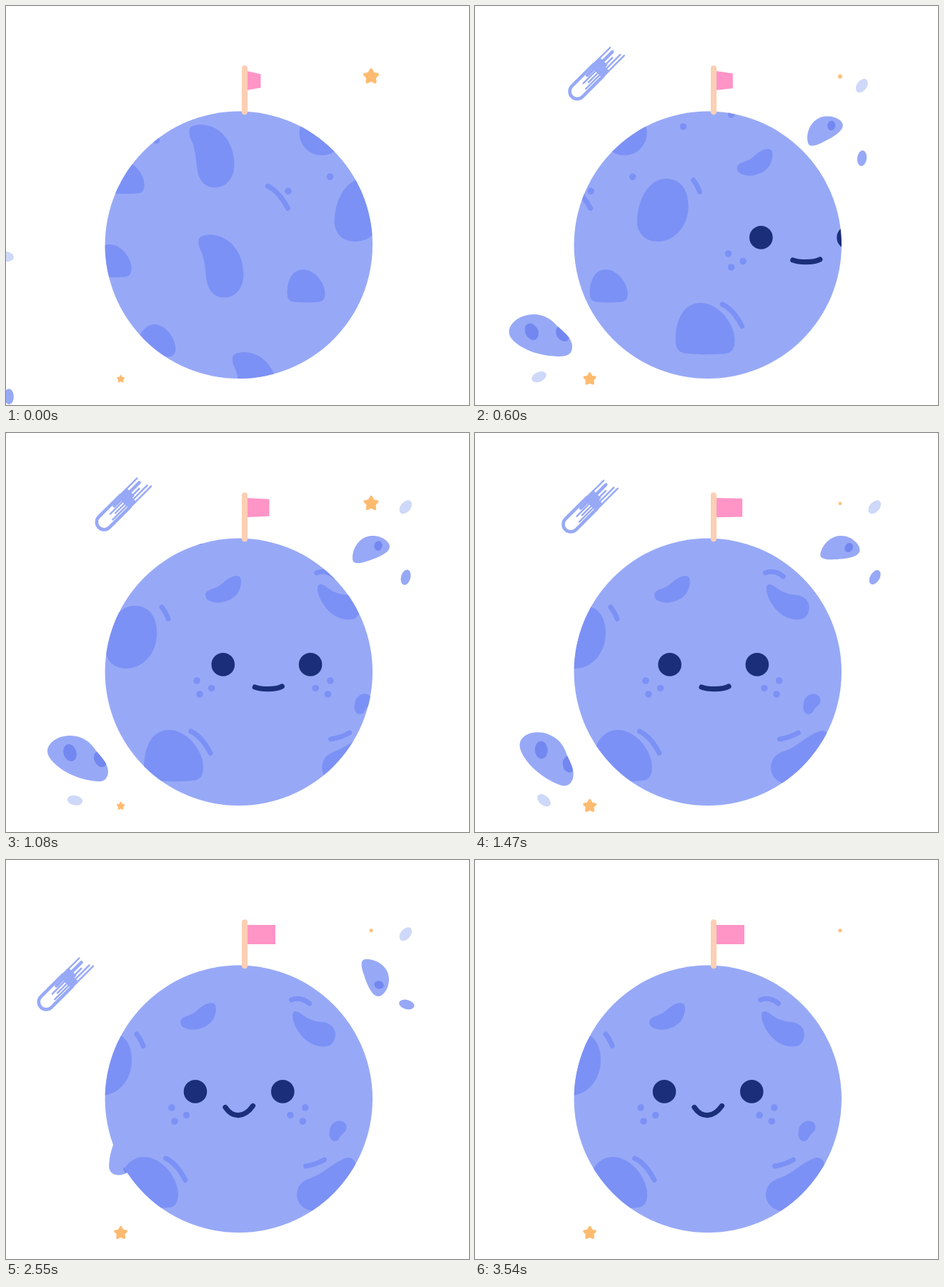
These frames come from a looping animation (648x559 px, 3570 ms). An HTML page:

```html
<!DOCTYPE html>
<html lang="en">
<head>
<meta charset="utf-8">
<title>Little planet</title>
<style>
  html, body { margin: 0; width: 100%; height: 100%; overflow: hidden; background: #fff; }
  svg { display: block; width: 648px; height: 559px; }

  .turn, .fly, .spin, .comet, .star, .flag, .mouth {
    animation: 3570ms linear infinite;
  }
  /* cubic ease-out, unless a keyframe says otherwise */
  .turn, .fly, .comet { animation-timing-function: cubic-bezier(.3333, 1, .6667, 1); }
  .star, .flag { animation-timing-function: cubic-bezier(.37, 0, .63, 1); }
  .mouth { animation-timing-function: ease-in-out; }

  /* planet surface and face slide at different speeds */
  .turn { animation-name: turn; }
  @keyframes turn {
    from { translate: var(--x) 0; }
    56.3%, to { translate: 0 0; }
  }

  /* debris: swoop in, hover, swoop out with a cubic ease-in */
  .fly { animation-name: var(--name); }
  @keyframes rock {
    from { translate: var(--start); }
    24.65%, 70.73% { translate: 0 0; }
    70.73% { animation-timing-function: cubic-bezier(.3333, 0, .6667, 0); }
    to { translate: var(--end); }
  }
  @keyframes chip {
    from { translate: var(--start); }
    24.65%, 60.92% { translate: 0 0; }
    60.92% { animation-timing-function: cubic-bezier(.3333, 0, .6667, 0); }
    to { translate: var(--end); }
  }
  @keyframes pebble {
    from { translate: var(--start); }
    24.65%, 76.25% { translate: 0 0; }
    76.25% { animation-timing-function: cubic-bezier(.3333, 0, .6667, 0); }
    to { translate: var(--end); }
  }
  @keyframes crumb {
    from { translate: var(--start); }
    24.65%, 77.6% { translate: 0 0; }
    77.6% { animation-timing-function: cubic-bezier(.3333, 0, .6667, 0); }
    to { translate: var(--end); }
  }

  .spin { animation-name: var(--how, spin); transform-origin: var(--at); }
  @keyframes spin {
    from { rotate: -16deg; }
    16.81% { rotate: -8deg; }
    30.25% { rotate: 0deg; animation-timing-function: cubic-bezier(.333, .1, .667, .58); }
    53.78% { rotate: 46deg; }
    71.43% { rotate: 90deg; }
    to { rotate: 162deg; }
  }
  @keyframes tumble {
    from { rotate: -77deg; }
    16.81% { rotate: -25deg; }
    53.78% { rotate: 75deg; }
    84.03% { rotate: 182deg; }
    to { rotate: 238deg; }
  }
  @keyframes settle {
    from { rotate: -120deg; animation-timing-function: cubic-bezier(.3333, 1, .6667, 1); }
    24.65%, to { rotate: 0deg; }
  }

  .comet { animation-name: comet; }
  @keyframes comet {
    from { translate: 168.5px -153px; }
    24.65% { translate: -6.5px 6px; animation-timing-function: cubic-bezier(.3333, 0, .6667, 0); }
    53.78% { translate: -25.5px 23.5px; animation-timing-function: cubic-bezier(.333, .19, .667, .35); }
    71.43% { translate: -87.5px 80px; animation-timing-function: cubic-bezier(.333, .21, .667, .61); }
    84.03%, to { translate: -242px 220px; }
  }

  .star { animation-name: pulse; }
  @keyframes pulse {
    from, 28.01%, 56.02%, 84.03% { scale: var(--a); }
    14.01%, 42.02%, 70.03%, 98.04% { scale: var(--b); }
    to { scale: var(--c); }
  }

  .flag { animation-name: flag; }
  @keyframes flag {
    from { d: path("M337 91L356.5 95.5L356.5 114.5L337 118Z"); }
    54.6%, to { d: path("M337 91L377 91L377 118L337 118Z"); }
  }

  .mouth { animation-name: smile; }
  @keyframes smile {
    from, 55.5% { d: path("M309.5 356C318 359.5 338 360 347.5 355"); }
    66%, to { d: path("M307 346.5C317 361.5 333 362 345.5 344.5"); }
  }

  .body { fill: #97a9f6; }
  .pale { fill: #ced8f8; }
  .pit { fill: #7287f0; }
  .mark { fill: #7c91f5; }
  .line { fill: none; stroke: #7c91f5; stroke-width: 7; stroke-linecap: round; }
  .gold { fill: #fdbb70; stroke: #fdbb70; stroke-width: 4; stroke-linejoin: round; }
</style>
</head>
<body>
<svg viewBox="0 0 648 559">
  <defs>
    <clipPath id="disc"><circle cx="325.8" cy="334.8" r="187.2"/></clipPath>
    <path id="rockShape" d="M58 444C60 432 75 423 92 424C108 425 118 433 126 445C134 455 143 463 143 475C142 484 138 489 127 488C110 487 88 479 75 469C65 461 57 453 58 444Z"/>
    <clipPath id="rockClip"><use href="#rockShape"/></clipPath>
    <path id="dome" d="M0 52C0 24 11 0 35 0C61 0 83 30 83 52C83 64 79 70 69 71C49 73 27 72 16 71C4 70 0 63 0 52Z"/>
    <path id="boot" d="M0 10C-1 2 7 0 18 0C43 1 63 24 63 56C63 76 51 88 36 88C21 88 13 77 11 62C9 44 8 34 4 24C1 18 0 15 0 10Z"/>
    <path id="starShape" class="gold" d="M0-9.5L2.94-4.05L9.03-2.94L4.76 1.55L5.58 7.69L0 5L-5.58 7.69L-4.76 1.55L-9.03-2.94L-2.94-4.05Z"/>
    <circle id="dot" r="4.8"/>
  </defs>

  <g class="comet">
    <g transform="translate(144 118.7) rotate(-45)" fill="none" stroke="#97a9f6">
      <path stroke-width="4.6" d="M44-10.5H0A10.5 10.5 0 0 0 0 10.5H42"/>
      <path stroke="none" fill="#97a9f6" d="M38-12H56V4H52V12H38Z"/>
      <g stroke-linecap="round">
        <path stroke-width="2.4" d="M40-10.8H76M50 1.5H68M48 6.2H79M40 11H82M14-2H40M20 2.2H40M11 6H40"/>
        <path stroke-width="4.6" d="M50-4.4H74M26-6H40"/>
      </g>
    </g>
  </g>

  <g class="fly" style="--name:crumb;--start:-557px 346px;--end:410px -203px">
    <g class="spin" style="--at:560px 203px">
      <ellipse class="body" cx="559.5" cy="202.2" rx="11" ry="6.6" transform="rotate(-75 559.5 202.2)"/>
    </g>
  </g>
  <g class="fly" style="--name:crumb;--start:-561px 248px;--end:448px -150px">
    <g class="spin" style="--how:settle;--at:559.3px 103.7px">
      <ellipse class="pale" cx="559.3" cy="103.7" rx="10.8" ry="7" transform="rotate(-50 559.3 103.7)"/>
    </g>
  </g>
  <g class="fly" style="--name:pebble;--start:-656px 330px;--end:509px -265px">
    <g class="spin" style="--at:513px 167px">
      <path class="body" d="M485 175C485 160 496 144 513 144C526 144 537 152 537 159C537 168 520 175 507 179C499 182 493 183 489 182C486 181 485 179 485 175Z"/>
      <ellipse class="pit" cx="521" cy="158" rx="5.6" ry="6.8" transform="rotate(15 521 158)"/>
    </g>
  </g>
  <g class="fly" style="--name:chip;--start:-219px 156px;--end:2265px -1608px">
    <g class="spin" style="--how:tumble;--at:96.5px 514.7px">
      <ellipse class="pale" cx="96.5" cy="514.7" rx="10.8" ry="6.8"/>
    </g>
  </g>
  <g class="fly" style="--name:rock;--start:-281px 187px;--end:952px -743px">
    <g class="spin" style="--at:105.3px 457.8px">
      <use class="body" href="#rockShape"/>
      <g class="pit" clip-path="url(#rockClip)">
        <ellipse cx="89.5" cy="448" rx="9" ry="12.3" transform="rotate(-18 89.5 448)"/>
        <ellipse cx="132" cy="457" rx="8.5" ry="11.5" transform="rotate(-25 132 457)"/>
      </g>
    </g>
  </g>

  <circle class="body" cx="325.8" cy="334.8" r="187.2"/>
  <g clip-path="url(#disc)">
    <g class="turn" style="--x:356px">
      <g class="mark">
        <path d="M244 226C246 218 258 219 266 212C274 204 284 198 291 201C297 205 293 220 288 226C278 237 262 240 252 236C246 234 244 231 244 226Z"/>
        <path d="M401 216C402 211 406 211 411 214C420 221 428 226 443 227C453 228 460 234 461 243C461 252 457 260 449 261C438 263 425 258 416 249C407 239 400 226 401 216Z"/>
        <path d="M176 281C176 308 157 330 133 330C115 330 104 318 104 301C105 270 121 242 145 242C165 242 176 257 176 281Z"/>
        <path d="M453 380C453 370 462 364 470 366C478 368 478 377 474 381C469 385 468 387 466 391C463 395 456 395 454 390C452 386 452 384 453 380Z"/>
        <path d="M407 468C408 456 414 450 425 446C445 440 460 421 478 417C492 416 495 440 490 460L470 500L430 492C415 490 407 480 407 468Z"/>
        <path d="M-171 470C-166 452-156 446-148 446C-132 446-118 466-118 480C-118 490-126 493-132 491C-146 488-161 480-171 470Z"/>
        <ellipse cx="86.5" cy="178" rx="31.5" ry="31.3"/>
        <use href="#dome" x="158" y="416"/>
        <use href="#dome" transform="translate(38 369.3) scale(.64)"/>
        <use href="#dome" transform="translate(-233 334) scale(.64)"/>
        <use href="#dome" transform="translate(-215 217) scale(.64)"/>
        <use href="#boot" x="-99" y="166.3"/>
        <use href="#boot" x="-86" y="320.5"/>
        <use href="#boot" x="-38.5" y="485"/>
        <use href="#dot" x="232" y="347"/>
        <use href="#dot" x="252.5" y="357.5"/>
        <use href="#dot" x="236" y="366"/>
        <use href="#dot" x="418.8" y="347"/>
        <use href="#dot" x="398" y="357.5"/>
        <use href="#dot" x="415.3" y="366"/>
        <use href="#dot" x="236" y="152"/>
        <use href="#dot" x="168.8" y="169"/>
        <use href="#dot" x="98" y="239.3"/>
        <use href="#dot" x="39.5" y="259.4"/>
        <use href="#dot" x="-145" y="188"/>
      </g>
      <path class="line" d="M399.5 196Q412 191 424.5 201M183 244Q188 250 192 260.5M223.5 418Q239 425 251 448.5M419.5 429Q433 427 445.5 420M11 252.5Q26 259 39 283.5"/>
    </g>
    <g class="turn" style="--x:393px" fill="#1b2e79">
      <circle cx="265" cy="324.4" r="16.3"/>
      <circle cx="387.3" cy="324.4" r="16.3"/>
      <path class="mouth" d="M309.5 356C318 359.5 338 360 347.5 355" fill="none" stroke="#1b2e79" stroke-width="7.2" stroke-linecap="round"/>
    </g>
  </g>

  <path class="flag" fill="#ff94c6" d="M337 91L377 91L377 118L337 118Z"/>
  <rect x="330" y="83.3" width="8" height="69" rx="4" fill="#fccfb4"/>

  <g transform="translate(511 98.8)">
    <use class="star" href="#starShape" style="--a:1;--b:.24;--c:.28"/>
  </g>
  <g transform="translate(160.6 522.6) scale(.86)">
    <use class="star" href="#starShape" style="--a:.58;--b:1;--c:.98"/>
  </g>
</svg>
</body>
</html>
```
